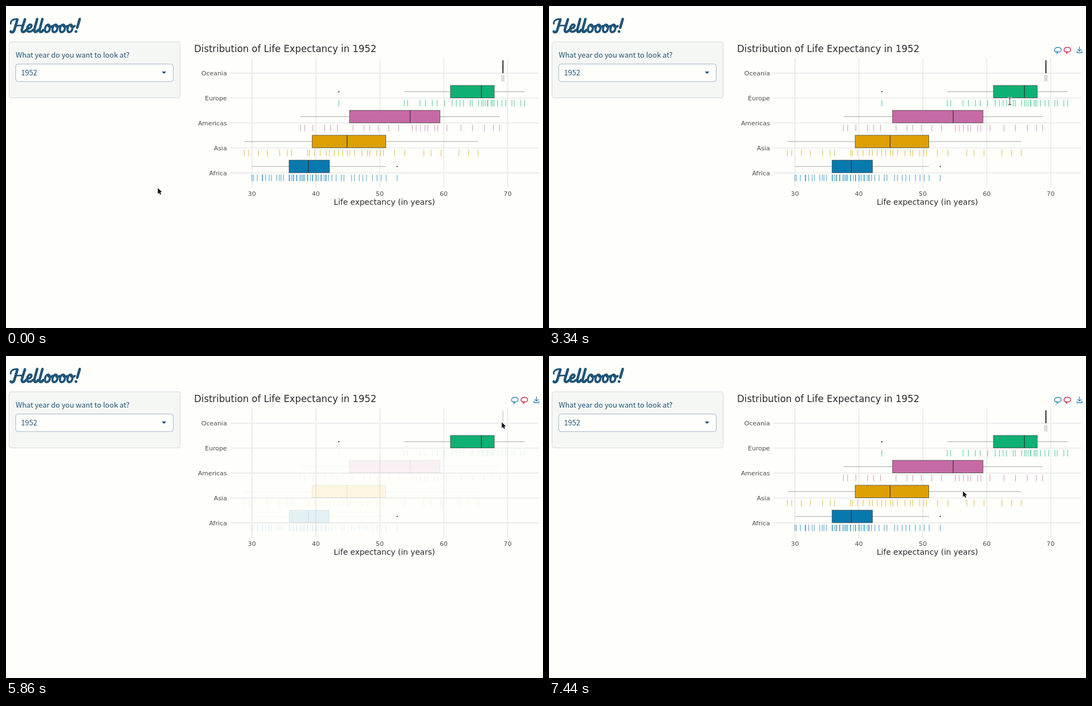
An HTML page with a canvas that plays this animation: 965 by 580 pixels, repeating every 8000 ms.

```html
<!DOCTYPE html>
<html lang="en">
<head>
<meta charset="utf-8">
<title>Life expectancy</title>
<style>
html, body { margin: 0; width: 100%; height: 100%; overflow: hidden; background: #fefffb; }
canvas { display: block; width: 965px; height: 580px; }
</style>
</head>
<body>
<canvas id="stage" width="965" height="580" aria-label="Helloooo! Distribution of Life Expectancy in 1952"></canvas>
<script>
const ctx = document.getElementById('stage').getContext('2d');
const LOOP = 8000;
const PAPER = '#fefffb', NAVY = '#1f5478', GRID = '#ebebeb';
const SANS = '"Noto Sans CJK JP", "Noto Sans CJK SC", "Noto Sans CJK", "Open Sans", sans-serif';
const PLOT = '"DejaVu Sans", sans-serif';

// summary: low whisker, lower quartile, median, upper quartile, high whisker
const rows = [
  { name: 'Oceania', color: '#777777', count: 2, summary: [69.12, 69.19, 69.26, 69.32, 69.39] },
  { name: 'Europe', color: '#0fb073', count: 29, summary: [53.82, 61.06, 65.9, 67.9, 72.67], outlier: 43.59 },
  { name: 'Americas', color: '#c56aa5', count: 25, summary: [37.58, 45.26, 54.75, 59.42, 68.75] },
  { name: 'Asia', color: '#dca004', count: 33, summary: [28.8, 39.42, 44.87, 50.94, 65.39] },
  { name: 'Africa', color: '#0779ae', count: 51, summary: [30, 35.81, 38.83, 42.12, 50.99], outlier: 52.72 }
];

// The pointer path, in steps of the pointer clock.
const STEP = 280, FIRST_MOVE = 400;
const path = [
  [-1, 272, 327], [0, 467, 387], [1, 472, 391], [2, 541, 396], [4, 535, 450.5], [5, 538, 477],
  [6, 629, 478], [7, 724, 435.5], [8, 785, 214.5], [10, 828, 171], [12, 888, 114], [14, 907, 87],
  [16, 913, 82.5], [18, 913, 82.5], [19, 890, 118.5], [20, 890, 118.5], [21, 767, 271],
  [23, 742.5, 265.5], [25, 743, 242.5]
];

const FADE = 120;
const hovers = [
  { from: 2940, to: 3220, name: 'Americas' },
  { from: 5620, to: 6020, name: 'Europe' },
  { from: 6580, to: 6700 },
  { from: 7120, to: 7160 }
];

const clamp = v => Math.min(1, Math.max(0, v));
const mix = (a, b, k) => a + (b - a) * k;
const px = years => 442 + (years - 30) * 11.487;

function seeded(seed) {
  return () => (seed = seed * 16807 % 2147483647) / 2147483647;
}

// Spreads the countries evenly over the quartiles, with some jitter.
function sampleValues({ count, summary, outlier }, random) {
  const values = Array.from({ length: count }, (_, i) => {
    const edge = i === 0 || i === count - 1;
    const p = 4 * clamp((i + (edge ? 0 : random() - 0.5)) / (count - 1));
    const quarter = Math.min(3, Math.floor(p));
    return mix(summary[quarter], summary[quarter + 1], p - quarter);
  });
  return outlier ? [...values, outlier] : values;
}

rows.forEach((row, i) => {
  row.y = 121 + i * 44.88;
  row.values = sampleValues(row, seeded(1952 + i));
});

function line(x1, y1, x2, y2, color, width) {
  ctx.strokeStyle = color;
  ctx.lineWidth = width;
  ctx.beginPath();
  ctx.moveTo(x1, y1);
  ctx.lineTo(x2, y2);
  ctx.stroke();
}

function text(str, x, y, size, color, family = PLOT, align = 'left') {
  ctx.font = `${size}px ${family}`;
  ctx.fillStyle = color;
  ctx.textAlign = align;
  ctx.fillText(str, x, y);
}

function roundBox(x, y, w, h, fill, stroke) {
  ctx.beginPath();
  ctx.roundRect(x, y, w, h, 4);
  ctx.fillStyle = fill;
  ctx.fill();
  ctx.strokeStyle = stroke;
  ctx.lineWidth = 1;
  ctx.stroke();
}

function strokePath(d, color, width, dx = 0, dy = 0) {
  ctx.save();
  ctx.translate(dx, dy);
  ctx.lineCap = ctx.lineJoin = 'round';
  ctx.strokeStyle = color;
  ctx.lineWidth = width;
  ctx.stroke(new Path2D(d));
  ctx.restore();
}

function drawHeading() {
  const pen = (d, width, dx) => strokePath(d, NAVY, width, dx);
  pen('M8.5 32 C8 26 13 23.5 20 23.5', 2.8);
  pen('M20.5 24.5 L15 43 C13.5 48 9.5 48 8.5 46', 4.6);
  pen('M17 36 C22 34 27 36 31 35', 2.8);
  pen('M34 24 L28.5 42 C27.5 48 32 48 36 43.5', 4.6);
  pen('M38 41 C44 41 47.5 36 45 33.7 C41.5 32 37 38 38 43 C39 48 45 47 48.5 43', 3.9);
  for (const dx of [0, 9.5]) pen('M56 23.5 L51 42 C50 48 54 48 57.5 43.5', 4.6, dx);
  for (let i = 0; i < 4; i++)
    pen('M76 33.5 C70 33 67.5 47 73 47 C79 47 81.5 35 76 33.5 C75.5 38.5 80 39 83 36', 3.9, i * 13.5);
  pen('M132.5 23.5 L128 39', 4.6);
  pen('M125.8 46 L125.8 46.1', 5);
}

function drawForm() {
  roundBox(5.5, 64.5, 307.5, 101, '#f5f7f5', '#d3d8d8');
  text('What year do you want to look at?', 17.5, 92.5, 13.05, NAVY, SANS);
  roundBox(17.5, 104.5, 283, 31.5, PAPER, '#a2b4c8');
  text('1952', 27, 125.3, 13.05, NAVY, SANS);
  ctx.beginPath();
  ctx.moveTo(280, 118);
  ctx.lineTo(288, 118);
  ctx.lineTo(284, 122.3);
  ctx.fill();
}

function drawAxes() {
  text('Distribution of Life Expectancy in 1952', 338, 83, 16.85, '#2b2b2b');
  for (const { name, y } of rows) {
    line(403, y, 957.5, y, GRID, 1.9);
    text(name, 397, y + 4.3, 11.23, '#4d4d4d', PLOT, 'right');
  }
  for (let years = 30; years <= 70; years += 10) {
    line(px(years), 94, px(years), 327.5, GRID, 1.9);
    text(years, px(years), 342, 11.23, '#4d4d4d', PLOT, 'center');
  }
  text('Life expectancy (in years)', 680, 357.8, 14.04, '#2b2b2b', PLOT, 'center');
}

function drawRow({ name, y, color, summary, values, outlier }, hover) {
  const [low, left, median, right, high] = summary.map(px);
  const top = y - 22.8, height = 22.5, mid = y - 11.5;

  ctx.globalAlpha = name === hover.name ? 1 : hover.rest;
  line(low, mid, left, mid, '#a4a4a4', 1);
  line(right, mid, high, mid, '#a4a4a4', 1);
  ctx.fillStyle = color;
  ctx.fillRect(left, top, right - left, height);
  ctx.strokeStyle = 'rgba(45,45,45,.75)';
  ctx.lineWidth = 0.9;
  ctx.strokeRect(left, top, right - left, height);
  line(median, top, median, top + height, 'rgba(40,40,40,.9)', 1.2);

  ctx.globalAlpha = Math.min(0.62, hover.rest);
  for (const v of values) line(px(v), y + 3.2, px(v), y + 15, color, 1.2);

  ctx.globalAlpha = 1;
  if (outlier) {
    ctx.fillStyle = '#1c1c1c';
    ctx.beginPath();
    ctx.arc(px(outlier), mid, 1.1, 0, 7);
    ctx.fill();
  }
}

function drawToolbar(t) {
  const lasso = 'M3.5 9 C-1.5 7.5 -1 0.5 6.5 0.5 C14 0.5 14 9 6.5 9 L4.5 9 M4.5 8 C6.5 9 5.5 11 4 12';
  const download = 'M4.3 0 V7 M1.3 4.5 L4.3 7.5 L7.3 4.5 M0 7.5 V10.5 H8.6 V7.5';
  ctx.globalAlpha = clamp((t - 2780) / 240);
  strokePath(lasso, '#2f88bb', 1.4, 908.3, 74);
  strokePath(lasso, '#cb2a50', 1.4, 925.3, 74);
  strokePath(download, '#3c87be', 1.4, 949, 73.7);
  ctx.globalAlpha = 1;
}

function drawBeam(x, y) {
  const beam = 'M-2.5 -6 Q0 -6 0 -4 Q0 -6 2.5 -6 M0 -4 V5 M-2.5 7 Q0 7 0 5 Q0 7 2.5 7';
  strokePath(beam, 'rgba(255,255,255,.8)', 2.4, x, y);
  strokePath(beam, '#333', 1.1, x, y);
}

function drawArrow(x, y) {
  const arrow = 'M0.8 1 V11.3 L3.2 9.2 L4.9 12.9 L6.7 12.1 L5.1 8.4 L8.2 8.1 Z';
  strokePath(arrow, '#fff', 1.6, x, y);
  ctx.save();
  ctx.translate(x, y);
  ctx.fillStyle = '#111';
  ctx.fill(new Path2D(arrow));
  ctx.restore();
}

function drawPointer(t) {
  const step = Math.max(-1, Math.floor((t - FIRST_MOVE) / STEP));
  const next = path.find(key => key[0] >= step) ?? path.at(-1);
  const last = path.findLast(key => key[0] <= step);
  const k = next === last ? 0 : clamp((step - last[0]) / (next[0] - last[0]));
  const x = mix(last[1], next[1], k), y = mix(last[2], next[2], k);
  const overText = step === 10;
  (overText ? drawBeam : drawArrow)(x, y);
}

function hoverAt(t) {
  const hover = hovers.find(h => t >= h.from && t < h.to);
  if (!hover) return { rest: 1 };
  const depth = clamp(Math.min(t - hover.from, hover.to - t) / FADE);
  return { name: hover.name, rest: 1 - 0.9 * depth };
}

function draw(t) {
  const hover = hoverAt(t);
  ctx.fillStyle = PAPER;
  ctx.fillRect(0, 0, 965, 580);
  drawHeading();
  drawForm();
  drawAxes();
  for (const row of rows) drawRow(row, hover);
  drawToolbar(t);
  drawPointer(t);
}

const start = performance.now();
function tick() {
  draw((performance.now() - start) % LOOP);
  requestAnimationFrame(tick);
}
tick();
</script>
</body>
</html>
```
